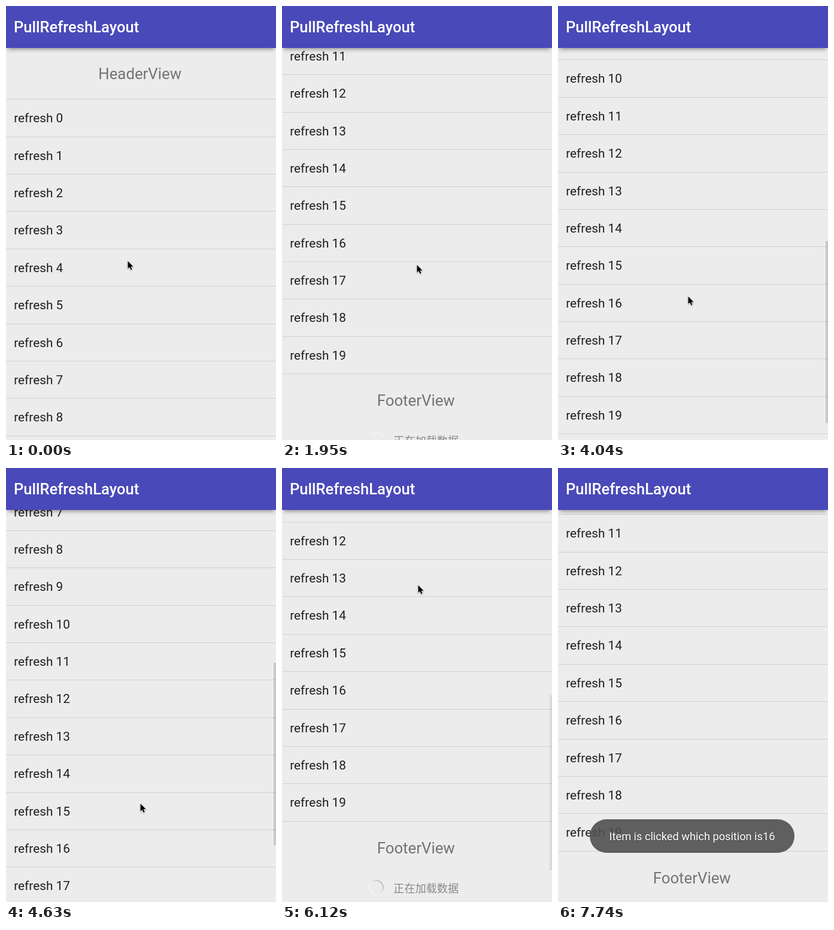
Recreate the animation shown at these times as an HTML page. Size 451x724 px, loop 8840 ms.

```html
<!DOCTYPE html>
<html lang="en">
<head>
<meta charset="utf-8">
<title>Pull to refresh</title>
<style>
html, body { margin: 0; width: 100%; height: 100%; overflow: hidden; background: #ececec; }
body { position: relative; font-family: Roboto, sans-serif; color: #1f1f1f; }
body > * { position: absolute; }
#bar {
  left: 0; top: 0; width: 100%; height: 70px; z-index: 2;
  background: #4949b9; color: #fff; box-shadow: 0 5px 7px -3px rgba(0,0,0,.42);
  font-size: 25.55px; font-weight: 500; line-height: 70px; text-indent: 13px;
}
#list { left: 0; width: 451px; }
#list div { box-sizing: border-box; }
.row {
  height: 62.37px; line-height: 62.5px; padding-left: 13.2px;
  border-bottom: 1px solid #d1d1d1; font-size: 20.8px;
}
.edge { width: 451px; padding-right: 3.6px; text-align: center; font-size: 25.8px; color: #737373; }
#head { height: 86.4px; line-height: 86px; border-bottom: 1px solid #d1d1d1; }
#foot { height: 85.2px; line-height: 88px; }
#load {
  position: relative; height: 50px; padding-left: 186px; color: #8a8a8a;
  font: 18.2px/50px "Noto Sans CJK SC", "Noto Sans CJK", sans-serif;
}
#spin {
  position: absolute; left: 145px; top: 12.5px; width: 25px; height: 25px; border-radius: 50%;
  background: conic-gradient(#c4c4c4, #b9b9b9 55deg, #c6c6c6 105deg, #e6e6e6 140deg, #f6f6f6 220deg, #f2f2f2 310deg, #c4c4c4);
  -webkit-mask: radial-gradient(circle, transparent 10px, #000 10.7px);
  mask: radial-gradient(circle, transparent 10px, #000 10.7px);
}
#thumb { left: 447px; width: 4px; background: rgba(0,0,0,.15); }
#toast {
  left: 53px; top: 586px; width: 342px; height: 56px; border-radius: 28px; z-index: 3;
  background: rgba(80,80,80,.9); color: #fff; text-align: center; white-space: nowrap;
  font-size: 18.2px; line-height: 58px; text-shadow: 0 1px 1px rgba(0,0,0,.4);
}
#arrow { left: 0; top: 0; z-index: 4; overflow: visible; filter: drop-shadow(0 1px 1px rgba(0,0,0,.35)); }
</style>
</head>
<body>
<div id="bar">PullRefreshLayout</div>
<div id="list"></div>
<div id="thumb"></div>
<div id="toast">Item is clicked which position is16</div>
<svg id="arrow" width="12" height="19">
  <path transform="translate(.5 .5) scale(.87)" d="M0 0V14.5L3.4 11.4L5.7 16.8L8.1 15.8L5.8 10.5H10.4Z"
    stroke="#fff" stroke-width="1.2" paint-order="stroke"/>
</svg>
<script>
const $ = id => document.getElementById(id);
const LOOP = 8840, LAST = 52, TICK = 7740 / LAST, END = 764.5, PULL = 50;

const rows = Array.from({ length: 20 }, (_, i) => `<div class="row">refresh ${i}</div>`).join('');
$('list').innerHTML = `<div id="head" class="edge">HeaderView</div>${rows}
  <div id="foot" class="edge">FooterView</div>
  <div id="load"><div id="spin"></div>正在加载数据</div>`;

// Each gesture adds its travel to the list and the pointer, in ticks.
const gestures = [
  { from: 1, to: 5, scroll: END, x: 19, y: -155 },     // fling to the end
  { from: 8, to: 11, scroll: 0, x: 4, y: 220 },        // reach down
  { from: 11, to: 15, scroll: PULL, x: -2, y: -117 },  // pull up to load
  { from: 20, to: 22, scroll: -PULL, x: 0, y: 0 },     // loaded
  { from: 25, to: 27, scroll: -75, x: -7, y: 111 },    // drag back
  { from: 27, to: 36, scroll: -334, x: 17, y: 181 },
  { from: 36, to: 39, scroll: 458.5, x: -7, y: -470 }, // fling into loading
  { from: 45, to: 46, scroll: -PULL, x: 3, y: 155 },   // loaded, click a row
];

const clamp = v => Math.min(1, Math.max(0, v));
const smooth = k => k * k * (3 - 2 * k);
const travel = (key, tick) => gestures.reduce(
  (sum, g) => sum + g[key] * smooth(clamp((tick - g.from) / (g.to - g.from))), 0);

// The scroll thumb lingers after a scroll, then fades.
const thumbAlpha = tick => Math.max(...gestures.map(
  g => Math.abs(g.scroll) > PULL && tick >= g.from ? clamp((g.to + 3 - tick) / 2) : 0));

function draw(tick) {
  const y = travel('scroll', tick);
  const inside = Math.min(y, END), over = y - inside;
  $('list').style.top = 70 - y + 'px';

  const thumb = $('thumb').style, top = 428 - .48 * (END - inside);
  thumb.top = top - over + 'px';
  thumb.height = Math.min(304, 720 - top) + 'px';
  thumb.opacity = thumbAlpha(tick);

  const toast = clamp((tick - 48) / 2);
  $('toast').style.opacity = toast;
  $('arrow').style.opacity = toast < 1 ? 1 : 0;
  $('arrow').style.transform = `translate(${203 + travel('x', tick)}px, ${425 + travel('y', tick)}px)`;
  $('spin').style.transform = `rotate(${(tick - 17) * 60}deg)`;
}

const start = performance.now();
function play() {
  const ms = (performance.now() - start) % LOOP;
  draw(Math.min(LAST, Math.floor(ms / TICK)));
  requestAnimationFrame(play);
}
play();
</script>
</body>
</html>
```
